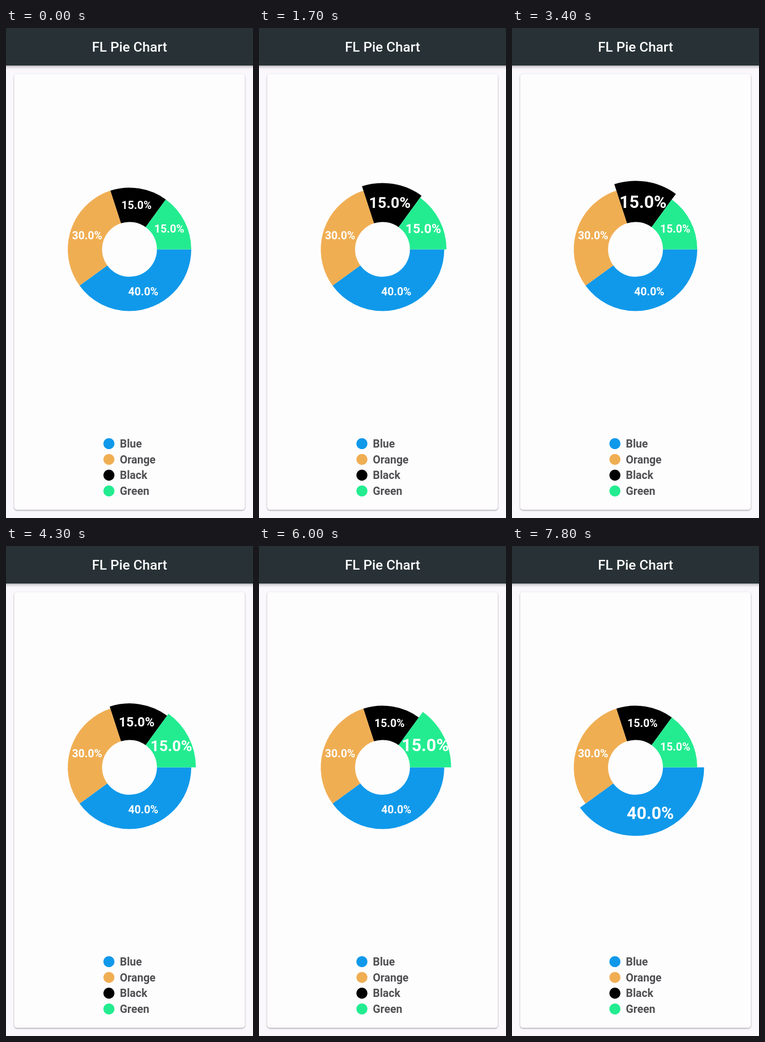
Recreate the animation shown at these times as an HTML page with a canvas. Size 480x953 px, loop 8 s.

```html
<!DOCTYPE html>
<html lang="en">
<head>
<meta charset="utf-8">
<title>Pie chart</title>
<style>
  html, body { margin: 0; width: 100%; height: 100%; overflow: hidden; background: #faf8fc; }
  canvas { display: block; width: 480px; height: 953px; }
</style>
</head>
<body>
<canvas id="stage"></canvas>
<script>
const W = 480, H = 953, LOOP = 8000, FADE = 150;
const CX = 240, CY = 430.5, HOLE = 160 / 3;
const FONT = 'Roboto, sans-serif';
const NONE = -1, BLUE = 0, ORANGE = 1, BLACK = 2, GREEN = 3;

const slices = [
  { name: 'Blue', share: 40, color: '#1099ea' },
  { name: 'Orange', share: 30, color: '#f0ae53' },
  { name: 'Black', share: 15, color: '#000000' },
  { name: 'Green', share: 15, color: '#23ec90' }
];

// Start time of each selection and the slice it raises
const touches = [
  [0, NONE], [50, BLUE], [1280, GREEN], [1600, BLACK], [1950, ORANGE], [2850, BLACK],
  [4200, GREEN], [4980, BLUE], [5550, GREEN], [6230, BLUE]
];

const canvas = document.getElementById('stage');
const ctx = canvas.getContext('2d');
const dpr = window.devicePixelRatio || 1;
canvas.width = W * dpr;
canvas.height = H * dpr;
ctx.scale(dpr, dpr);

const mix = (a, b, k) => a + (b - a) * k;

function raised(index, t) {
  let level = 0;
  for (const [start, picked] of touches) {
    if (t < start) break;
    const k = Math.min(1, (t - start) / FADE);
    level = mix(level, picked === index ? 1 : 0, k);
  }
  return level;
}

function text(str, x, y, size, weight, color, align) {
  ctx.font = `${weight} ${size}px ${FONT}`;
  ctx.textAlign = align;
  ctx.fillStyle = color;
  ctx.fillText(str, x, y);
}

function shadowed(alpha, blur, dy, draw) {
  ctx.save();
  ctx.shadowColor = `rgba(20, 10, 30, ${alpha})`;
  ctx.shadowBlur = blur * dpr;
  ctx.shadowOffsetY = dy * dpr;
  draw();
  ctx.restore();
}

function drawFrame() {
  ctx.fillStyle = '#faf8fc';
  ctx.fillRect(0, 0, W, H);

  shadowed(0.4, 3, 1.3, () => {
    ctx.fillStyle = '#fefdfe';
    ctx.beginPath();
    ctx.roundRect(16, 89.5, 448, 847.5, 5.3);
    ctx.fill();
  });

  shadowed(0.35, 6, 2, () => {
    ctx.fillStyle = '#283236';
    ctx.fillRect(-10, -10, W + 20, 83);
  });
  text('FL Pie Chart', CX, 46, 80 / 3, 500, '#ffffff', 'center');
}

function drawPie(t) {
  const labels = [];
  let from = 0;
  slices.forEach((s, i) => {
    const k = raised(i, t);
    const ring = mix(200 / 3, 80, k);
    const to = from + s.share / 100 * 2 * Math.PI;
    ctx.fillStyle = s.color;
    ctx.beginPath();
    ctx.arc(CX, CY, HOLE + ring, from, to);
    ctx.arc(CX, CY, HOLE, to, from, true);
    ctx.fill();
    labels.push({ share: s.share, angle: (from + to) / 2, dist: HOLE + ring / 2, size: mix(64, 100, k) / 3 });
    from = to;
  });
  for (const { share, angle, dist, size } of labels) {
    text(share.toFixed(1) + '%', CX + dist * Math.cos(angle),
      CY + dist * Math.sin(angle) + size * 0.341, size, 700, '#ffffff', 'center');
  }
}

function drawLegend() {
  slices.forEach((s, i) => {
    const y = 808.4 + i * 92 / 3;
    ctx.fillStyle = s.color;
    ctx.beginPath();
    ctx.arc(200, y, 32 / 3, 0, 2 * Math.PI);
    ctx.fill();
    text(s.name, 221.3, y + 7.5, 64 / 3, 700, '#505053', 'left');
  });
}

const origin = performance.now();

function render() {
  const t = Math.max(0, performance.now() - origin) % LOOP;
  drawFrame();
  drawPie(t);
  drawLegend();
  requestAnimationFrame(render);
}
render();
</script>
</body>
</html>
```
